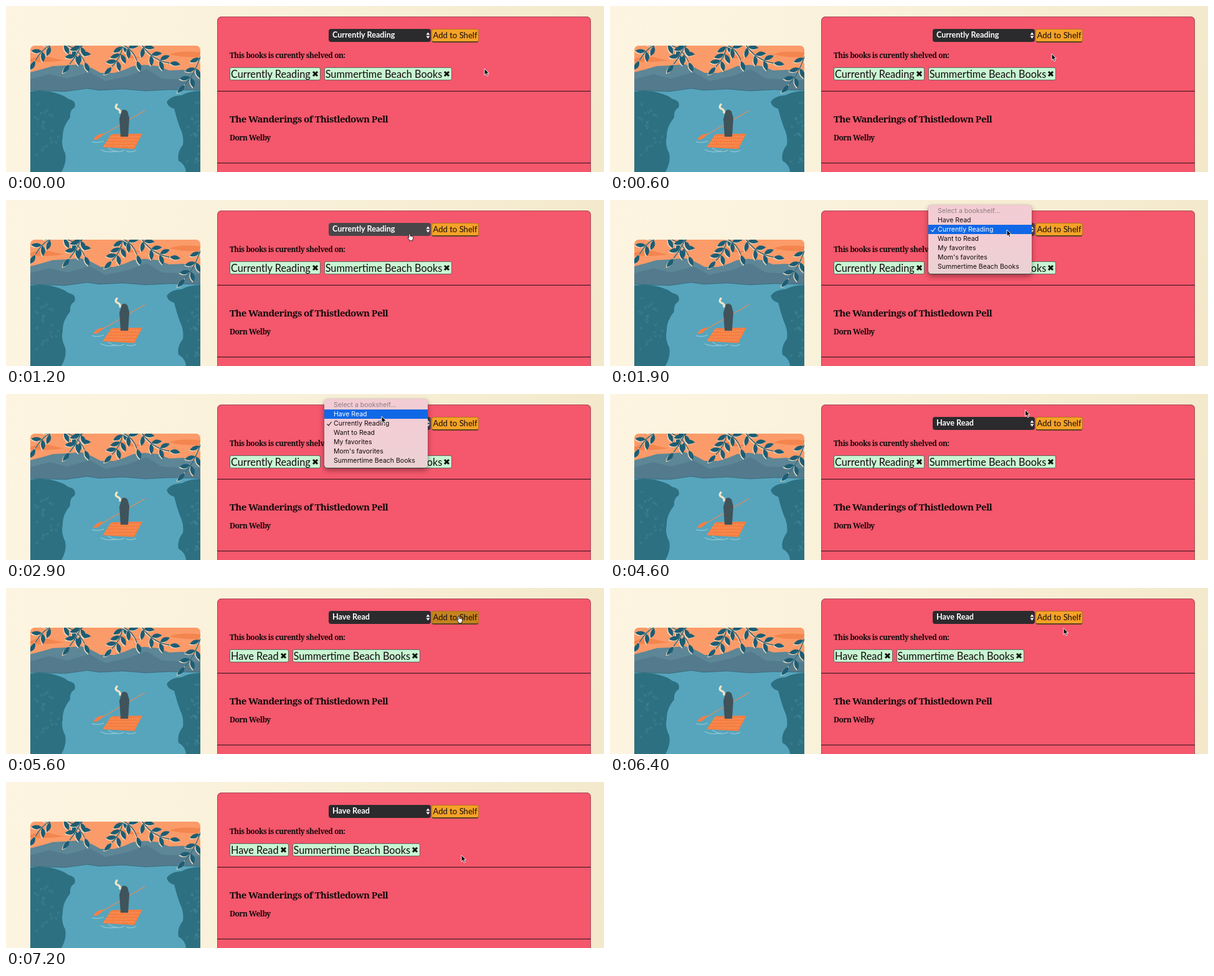
An HTML page that plays this animation: 960x268 px, repeating every 7.3 s.

```html
<!DOCTYPE html>
<html lang="en">
<head>
<meta charset="utf-8">
<title>Bookshelf</title>
<style>
  * { box-sizing: border-box; }
  html, body { margin: 0; width: 100%; height: 100%; overflow: hidden; }
  body { position: relative; background: linear-gradient(100deg, #fdf5e1, #f9f0d9 50%, #f3e8ca); color: #140a0c; }
  body > *, .card > * { position: absolute; white-space: nowrap; }
  .cover { left: 39px; top: 64px; width: 273px; height: 204px; border-radius: 7px 7px 0 0; }
  .card {
    left: 339px; top: 17px; width: 600px; height: 260px;
    background: #f5576c; border-radius: 7px; box-shadow: inset 0 0 0 1px #a8485a;
  }
  .rule { left: 0; width: 600px; height: 1px; background: #2a1015; }
  .slab { left: 20px; font: bold 11.8px/20px "Noto Serif", serif; letter-spacing: -.04em; }
  .title { font-size: 15.1px; }
  .select, .add, .tag { font-family: Lato, sans-serif; }
  .select {
    left: 179px; top: 20px; width: 164px; height: 21px; padding-left: 6px;
    border-radius: 4px; background: #2b2a2c; color: #fff;
    font-size: 12.6px; line-height: 19px; font-weight: bold;
  }
  .select.hover { background: #49464a; }
  .select svg { position: absolute; left: 156px; top: 5px; }
  .add {
    left: 344px; top: 20px; width: 76px; height: 22px; border-radius: 4px;
    background: #f5a227; border: 1px solid #b5731d; border-bottom: 2px solid #5b4420;
    font-size: 13.1px; line-height: 19px; text-align: center;
  }
  .add.hover { background: #c5831f; }
  .tags { left: 20px; top: 82px; display: flex; gap: 6px; }
  .tag {
    display: flex; align-items: center; height: 21px; padding: 0 2px 0 1px;
    background: #c8f5d2; border: 1px solid #5d6a60; border-radius: 3px;
    font-size: 16.3px; line-height: 18px;
  }
  .tag svg { margin-left: 2px; }
  .menu {
    left: 511px; top: 8px; width: 166px; height: 111px; padding-top: 2px;
    border-radius: 5px; background: linear-gradient(#f3ccd4, #f1ced5 60%, #ead2d3);
    box-shadow: 0 0 1px #0008, 0 4px 9px #0006;
    font: 10.5px/15px Inter, sans-serif;
  }
  .menu div { position: relative; height: 15px; padding-left: 15px; }
  .menu div:first-child { color: #8c7b80; }
  .menu .on { background: #1068e6; color: #fff; }
  .menu .checked::before {
    content: ""; position: absolute; left: 6px; top: 3px; width: 3px; height: 7px;
    border: solid currentColor; border-width: 0 1.3px 1.3px 0; transform: rotate(38deg);
  }
  .cursor { left: 0; top: 0; overflow: visible; }
</style>
</head>
<body>
<svg class="cover" viewBox="39 64 273 204">
  <path fill="#fb9b69" d="M39 64H312V140H39Z"/>
  <g fill="#f4854e">
    <path d="M39 86Q55 78 72 83T96 87Q70 92 39 90Z"/>
    <path d="M166 82Q180 74 196 79T232 82Q200 87 166 82Z"/>
    <path d="M262 78Q280 71 312 75V82Q286 84 262 78Z"/>
  </g>
  <path fill="#56a5bd" d="M39 130H312V268H39Z"/>
  <path fill="#5d8696" d="M39 107L58 102L75 97L96 96L120 94L137 100L152 108L174 108L190 103L204 97L222 95L244 97L262 104L284 103L312 110V136L262 135L224 137L188 134L150 136L130 133L95 138L39 136Z"/>
  <path fill="#4d7688" d="M39 118L70 110L98 117L134 107L160 121L196 113L226 102L250 117L312 120V136L262 135L224 137L188 134L150 136L130 133L95 138L39 136Z" opacity=".6"/>
  <path fill="none" stroke="#355f70" stroke-width=".7" d="M39 136L95 138L130 133L150 136L188 134L224 137L262 135L312 136"/>
  <g fill="#2d7081">
    <path d="M39 138Q62 135 78 140Q93 144 100 150Q114 153 110 164Q102 168 103 180Q90 196 91 212Q88 224 95 238Q98 252 89 268H39Z"/>
    <path d="M312 137Q292 138 282 144Q264 145 258 155Q260 163 270 166Q274 182 279 196Q286 210 284 224Q274 237 277 250Q288 256 289 268H312Z"/>
  </g>
  <g id="grass" stroke="#44899a" stroke-width=".8" fill="none"></g>
  <g fill="none" stroke="#b7dce0" stroke-width=".8">
    <path d="M138 219Q148 222 157 218M152 232Q164 238 178 234M164 229Q176 239 190 233M193 234Q201 237 209 233"/>
  </g>
  <path fill="#f57e42" d="M169 207L219 206L206 231L155 228Z"/>
  <path fill="none" stroke="#fbb07c" stroke-width=".8" stroke-dasharray="2 1.5" d="M167 211L216 211M164 216L213 216M161 221L210 221M158 226L207 226"/>
  <path fill="none" stroke="#e58a5c" stroke-width="1.4" d="M223 169L152 210"/>
  <path fill="#f57e42" d="M156 206Q147 206 140 215Q148 219 156 206Z"/>
  <path fill="#40535b" d="M186 169Q190 165 195 170L198 181L196 211H184L182 182Z"/>
  <path fill="none" stroke="#f5e4c6" stroke-width="3.4" stroke-linecap="round" d="M178 159Q174 164 179 166T183 172"/>
  <g id="leaves"></g>
</svg>

<main class="card">
  <div class="select"><span id="value"></span>
    <svg width="7" height="11" fill="#fff"><path d="M.5 4.5L3.5 .5L6.5 4.5ZM.5 6.5L3.5 10.5L6.5 6.5Z"/></svg>
  </div>
  <div class="add">Add to Shelf</div>
  <div class="slab" style="top:52px">This books is curently shelved on:</div>
  <div class="tags">
    <div class="tag"><span id="shelf"></span><svg width="11" height="11"><path id="cross" d="M2 2L9 9M9 2L2 9" stroke="#111" stroke-width="3.1"/></svg></div>
    <div class="tag"><span>Summertime Beach Books</span><svg width="11" height="11"><use href="#cross"/></svg></div>
  </div>
  <div class="rule" style="top:120px"></div>
  <div class="slab title" style="top:155px">The Wanderings of Thistledown Pell</div>
  <div class="slab" style="top:185px">Dorn Welby</div>
  <div class="rule" style="top:236px"></div>
</main>

<div class="menu">
  <div>Select a bookshelf...</div>
  <div>Have Read</div>
  <div class="checked">Currently Reading</div>
  <div>Want to Read</div>
  <div>My favorites</div>
  <div>Mom's favorites</div>
  <div>Summertime Beach Books</div>
</div>

<svg class="cursor" width="14" height="16">
  <path id="arrow" fill="#111" stroke="#fff" stroke-width=".9" d="M0 0V10.5L2.4 8.3L4.2 12.2L6 11.4L4.3 7.7H7.6Z"/>
  <path id="hand" fill="#fff" stroke="#111" stroke-width=".9" stroke-linejoin="round" d="M-1.2 7V1Q0 -.6 1 1V4.2Q2 3.6 2.8 4.6Q3.8 4 4.4 5.1Q5.8 4.8 5.9 6.2Q6 8.5 4.7 10V11.8H-.6V10.3L-3.3 7Q-3.4 5.2 -1.2 7Z"/>
</svg>

<script>
  const LOOP = 7300, STEP = 100;
  const OPEN = 1700, PICK = 3400, SHOW = 4100, SAVE = 5300;
  const $ = s => document.querySelector(s);

  // Cursor stops: time, x, y
  const path = [
    [0, 768, 101], [200, 768, 101], [1000, 650, 53], [1200, 648, 54], [1900, 637, 48],
    [2400, 632, 47], [2900, 603, 36], [3400, 598, 32], [4100, 602, 32], [4500, 658, 26],
    [4900, 712, 24], [5200, 728, 44], [5600, 727, 45], [6200, 727, 46], [6800, 731, 118], [LOOP, 731, 118]
  ];

  function cursorAt(t) {
    const i = path.findIndex(p => p[0] > t);
    const [t0, x0, y0] = path[i - 1], [t1, x1, y1] = path[i];
    const k = (t - t0) / (t1 - t0), e = k * k * (3 - 2 * k);
    return [x0 + (x1 - x0) * e, y0 + (y1 - y0) * e];
  }

  let seed = 7;
  const random = () => (seed = seed * 16807 % 2147483647) / 2147483647;

  function draw(parent, attrs) {
    const el = document.createElementNS("http://www.w3.org/2000/svg", "path");
    for (const key in attrs) el.setAttribute(key, attrs[key]);
    parent.append(el);
  }

  // Paired leaves along a quadratic stem
  function branch(x0, y0, cx, cy, x1, y1, pairs) {
    const stem = `M${x0} ${y0}Q${cx} ${cy} ${x1} ${y1}`;
    const at = (a, b, c, t) => (1 - t) ** 2 * a + 2 * t * (1 - t) * b + t * t * c;
    for (const [color, shift] of [["#f3dcc0", -1.2], ["#1d5d74", 0]]) {
      const move = `translate(${shift} ${-shift})`;
      draw($("#leaves"), { d: stem, fill: "none", stroke: color, "stroke-width": 1.3, transform: move });
      for (let i = 0; i <= pairs; i++) {
        const t = (i + .4) / (pairs + .4), x = at(x0, cx, x1, t), y = at(y0, cy, y1, t);
        const angle = Math.atan2((1 - t) * (cy - y0) + t * (y1 - cy), (1 - t) * (cx - x0) + t * (x1 - cx)) * 180 / Math.PI;
        const turns = i === pairs ? [0] : [-48, 48];
        for (const turn of turns) {
          draw($("#leaves"), {
            d: "M1 0Q9 -8 18 0Q9 6 1 0Z", fill: color,
            transform: `${move} translate(${x} ${y}) rotate(${angle + turn})`
          });
        }
      }
    }
  }

  branch(76, 62, 60, 66, 47, 88, 2);
  branch(86, 60, 116, 66, 126, 90, 3);
  branch(122, 60, 116, 76, 102, 94, 2);
  branch(188, 60, 186, 82, 170, 98, 3);
  branch(186, 62, 204, 70, 210, 88, 1);
  branch(216, 60, 234, 88, 262, 92, 3);
  branch(314, 76, 304, 108, 287, 127, 3);

  for (let i = 0; i < 44; i++) {
    const x = i % 2 ? 44 + random() * 42 : 290 + random() * 20, y = 152 + random() * 110;
    draw($("#grass"), { d: `M${x} ${y}l-1 -4m2 4l1.5 -4` });
  }

  const rows = [...document.querySelectorAll(".menu div")];
  const inside = (x, y, l, t, r, b) => x >= l && x < r && y >= t && y < b;

  function render(now) {
    const t = Math.floor(now % LOOP / STEP) * STEP;
    const [x, y] = cursorAt(t);
    const open = t >= OPEN && t < PICK, visible = t < PICK || t >= SHOW;
    const onSelect = visible && !open && inside(x, y, 518, 37, 682, 58);
    const onAdd = visible && inside(x, y, 683, 37, 759, 59);

    $("#value").textContent = t < PICK ? "Currently Reading" : "Have Read";
    $("#shelf").textContent = t < SAVE ? "Currently Reading" : "Have Read";
    $(".select").classList.toggle("hover", onSelect || open);
    $(".add").classList.toggle("hover", onAdd);
    $(".menu").style.display = open ? "" : "none";
    const current = Math.floor((y - 10) / 15);
    rows.forEach((row, i) => row.classList.toggle("on", i > 0 && i === current));

    const hand = onSelect || onAdd;
    $("#hand").style.display = hand ? "" : "none";
    $("#arrow").style.display = hand ? "none" : "";
    $(".cursor").style.display = visible ? "" : "none";
    $(".cursor").style.transform = `translate(${x}px, ${y}px)`;
  }

  const start = performance.now();
  function tick() {
    render(performance.now() - start);
    requestAnimationFrame(tick);
  }
  tick();
</script>
</body>
</html>
```
